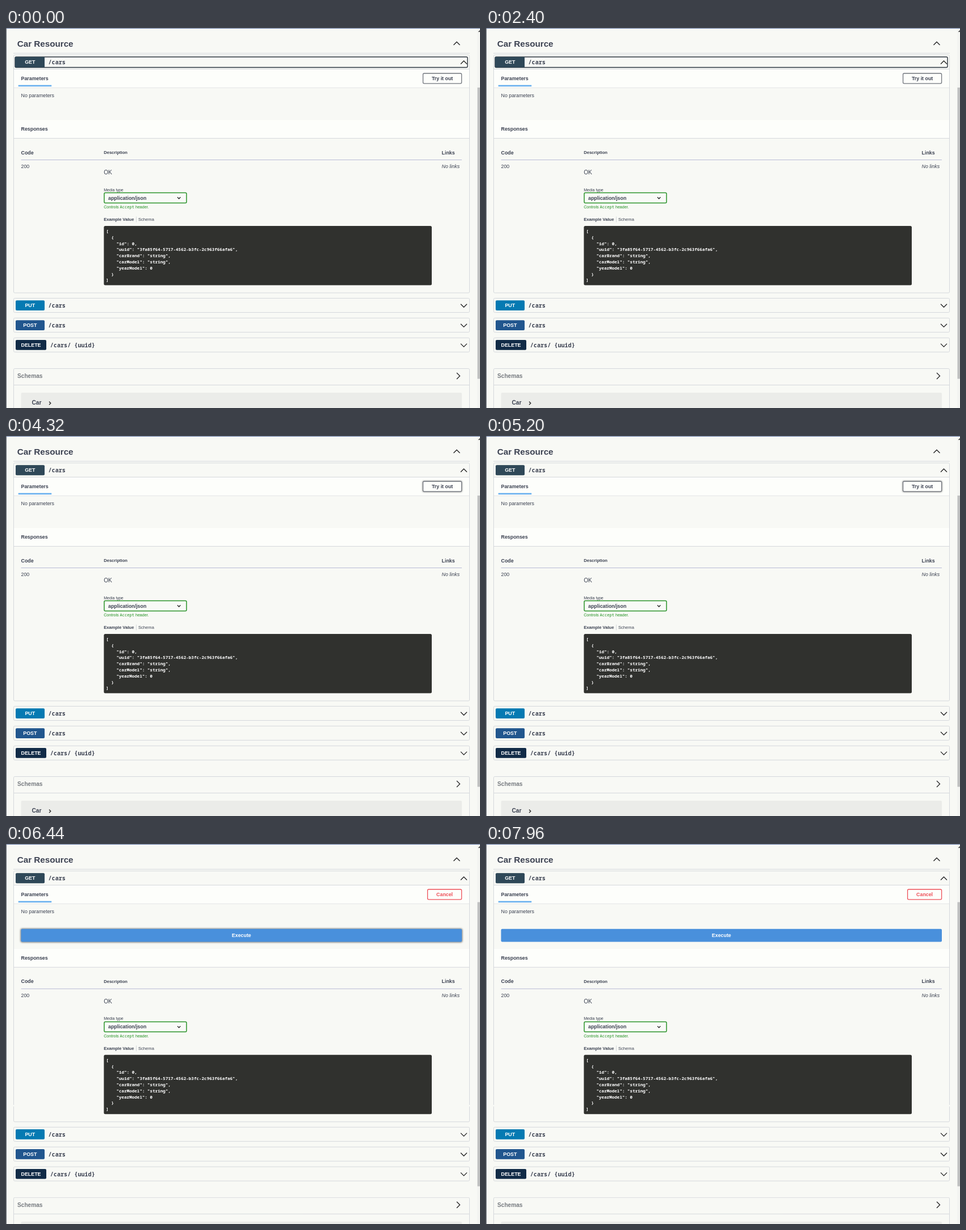
An HTML page that plays this animation: 835 px wide and 670 px high, repeating every 8000 ms.

```html
<!DOCTYPE html>
<html lang="en">
<head>
<meta charset="utf-8">
<title>API explorer</title>
<style>
html, body { margin: 0; width: 100%; height: 100%; overflow: hidden; background: #f8f9f5; }
svg { display: block; width: 835px; height: 670px; font: 8.86px "Liberation Sans", Arial, sans-serif; fill: #3b4151; }
text { white-space: pre; }
.b { font-weight: 700; }
.s { font-size: 7.6px; }
.xs { font-size: 7.09px; }
.m { font-size: 10.13px; }
.mid { text-anchor: middle; }
.w { fill: #fff; }
.mono { font-family: "Noto Sans Mono", "DejaVu Sans Mono", monospace; }
.path { font-size: 10.13px; font-weight: 600; }
.code { font-size: 7.59px; font-weight: 600; fill: #fff; }
.box, .rule { fill: none; stroke: #d5d8dc; }
.bar { fill: #fdfefb; }
.icon { fill: none; stroke: #222; stroke-width: 1.3; }
.halo { fill: #000; filter: blur(1.6px); opacity: 0; }

/* state changes on an 8 s clock */
.focus, .blur, .idle, .open, .low { animation: 8s step-end infinite; }
.focus { animation-name: focus; }
.blur { animation-name: blur; }
.idle { animation-name: idle; }
.open { animation-name: open; }
.low { animation-name: low; }
.tryHalo { animation: tryHalo 8s infinite; }
.execHalo { animation: execHalo 8s infinite; }
.cancel { animation: redden 8s infinite; }
@keyframes focus { 0% { visibility: visible } 36.5%, 100% { visibility: hidden } }
@keyframes blur { 0% { visibility: hidden } 36.5%, 100% { visibility: visible } }
@keyframes idle { 0% { visibility: visible } 67.25%, 100% { visibility: hidden } }
@keyframes open { 0% { visibility: hidden } 67.25%, 100% { visibility: visible } }
@keyframes low { 0% { transform: none } 67.25%, 100% { transform: translateY(22.8px) } }
@keyframes tryHalo { 0%, 52.5% { opacity: 0 } 54.5%, 100% { opacity: .4 } }
@keyframes execHalo { 0%, 78.75% { opacity: 0 } 80.25%, 90% { opacity: .5 } 91.5%, 100% { opacity: 0 } }
@keyframes redden { 0%, 67.25% { color: #3b4151 } 71%, 100% { color: #ee4f58 } }
</style>
</head>
<body>
<svg viewBox="0 0 835 670">
  <defs>
    <path id="up" class="icon" d="M-5.5 3 0-2.5 5.5 3"/>
    <path id="down" class="icon" d="M-5.5-2.5 0 3 5.5-2.5"/>
    <path id="right" class="icon" d="M-2.5-5.5 3 0-2.5 5.5"/>
  </defs>

  <rect width="835" height="670" fill="#f8f9f5"/>

  <!-- section title -->
  <text class="b" x="19.8" y="33" font-size="15.19">Car Resource</text>
  <use href="#up" x="794" y="27"/>
  <path class="rule" d="M13 44.5H817"/>

  <!-- GET header -->
  <path class="box" d="M13.5 480V49.5a2 2 0 0 1 2-2H814.5a2 2 0 0 1 2 2V480" style="clip-path: inset(0 0 20px)"/>
  <path class="rule" d="M14 72.5H816"/>
  <g class="focus">
    <rect x="16" y="51" width="797" height="18.5" rx="2" fill="none" stroke="#2b3440" stroke-width="1.4"/>
    <rect x="16" y="51" width="52" height="18.5" rx="1" fill="#2f4858"/>
  </g>
  <rect class="blur" x="17" y="51.3" width="51" height="18" rx="2" fill="#2f4858"/>
  <text class="b w mid" x="42.3" y="63.4">GET</text>
  <text class="mono path" x="74.5" y="64.2">/cars</text>
  <use href="#up" x="806.5" y="60.5"/>

  <!-- parameters -->
  <rect class="bar" x="14" y="73" width="802" height="32"/>
  <path class="rule" d="M14 105.3H816" stroke-opacity=".6"/>
  <text class="b" x="26.5" y="92">Parameters</text>
  <rect x="21.7" y="100.6" width="58.5" height="2.5" fill="#66aeee"/>
  <text x="26.5" y="122.4">No parameters</text>

  <g class="idle">
    <rect class="halo tryHalo" x="733.5" y="79" width="70" height="20" rx="3"/>
    <rect x="734.6" y="80" width="68" height="17.8" rx="2" fill="#fdfefb" stroke="#70747c" stroke-width="1.3"/>
    <text class="b mid" x="768.6" y="92">Try it out</text>
  </g>
  <g class="open">
    <g class="cancel">
      <rect x="742.6" y="80" width="60" height="17.8" rx="2" fill="#fdfefb" stroke="currentColor" stroke-width="1.3"/>
      <text class="b mid" x="772.6" y="92" fill="currentColor">Cancel</text>
    </g>
    <rect class="halo execHalo" x="25.5" y="149" width="778.5" height="24.5" rx="3"/>
    <rect x="26.5" y="149.8" width="776.5" height="22.8" rx="2" fill="#4990dc"/>
    <text class="b w mid" x="414.8" y="164.4">Execute</text>
  </g>

  <g class="low">
    <!-- responses -->
    <rect class="bar" x="14" y="162.2" width="802" height="32"/>
    <path class="rule" d="M14 194.5H816"/>
    <text class="b" x="26.5" y="181.4">Responses</text>
    <text class="b" x="26.5" y="222.5">Code</text>
    <text class="b s" x="172.2" y="222">Description</text>
    <text class="b" x="767.6" y="222.5">Links</text>
    <path class="rule" d="M26.5 232.5H803" style="stroke: #b9bbd6"/>
    <text x="26.5" y="247.3">200</text>
    <text class="m" x="172.2" y="258.3">OK</text>
    <text x="767.6" y="247.3" font-style="italic">No links</text>

    <text class="xs" x="172.2" y="287.5">Media type</text>
    <rect x="173" y="290.6" width="145" height="17.8" rx="2" fill="#f9faf7" stroke="#2a932a" stroke-width="1.5"/>
    <text class="b" x="180" y="302.6">application/json</text>
    <path class="icon" d="M302 298.3 304.7 301 307.4 298.3"/>
    <text class="xs" x="172.2" y="318" fill="#209020">Controls <tspan class="mono">Accept</tspan> header.</text>

    <text class="b s" x="172.2" y="340">Example Value</text>
    <path class="rule" d="M229.5 332.5V342.5"/>
    <text class="s" x="233" y="340">Schema</text>

    <rect x="172.4" y="349" width="577.6" height="104.5" rx="2.5" fill="#30312e"/>
    <g class="mono code">
      <text x="176.3" y="361">[</text>
      <text x="176.3" y="371.8">  {</text>
      <text x="176.3" y="382.6">    "id": 0,</text>
      <text x="176.3" y="393.4">    "uuid": "3fa85f64-5717-4562-b3fc-2c963f66afa6",</text>
      <text x="176.3" y="404.2">    "carBrand": "string",</text>
      <text x="176.3" y="415">    "carModel": "string",</text>
      <text x="176.3" y="425.8">    "yearModel": 0</text>
      <text x="176.3" y="436.6">  }</text>
      <text x="176.3" y="447.4">]</text>
    </g>
    <path class="box" d="M13.5 440V465a2 2 0 0 0 2 2H814.5a2 2 0 0 0 2-2V440"/>

    <!-- other operations -->
    <g>
      <rect class="box" x="13.5" y="476.5" width="803" height="25" rx="2"/>
      <rect x="17" y="480.3" width="51" height="17.7" rx="2" fill="#057ab2"/>
      <text class="b w mid" x="42.3" y="492.4">PUT</text>
      <text class="mono path" x="74.5" y="493.2">/cars</text>
      <use href="#down" x="806.5" y="489.3"/>
    </g>
    <g transform="translate(0 34.9)">
      <rect class="box" x="13.5" y="476.5" width="803" height="25" rx="2"/>
      <rect x="17" y="480.3" width="51" height="17.7" rx="2" fill="#21568e"/>
      <text class="b w mid" x="42.3" y="492.4">POST</text>
      <text class="mono path" x="74.5" y="493.2">/cars</text>
      <use href="#down" x="806.5" y="489.3"/>
    </g>
    <g transform="translate(0 69.8)">
      <rect class="box" x="13.5" y="476.5" width="803" height="25" rx="2"/>
      <rect x="17" y="480.3" width="54" height="17.7" rx="2" fill="#112b47"/>
      <text class="b w mid" x="44" y="492.4">DELETE</text>
      <text class="mono path" x="77.8" y="493.2">/cars/ {uuid}</text>
      <use href="#down" x="806.5" y="489.3"/>
    </g>

    <!-- schemas -->
    <rect class="box" x="13.5" y="600.5" width="803" height="120" rx="2"/>
    <path class="rule" d="M14 629.5H816"/>
    <text class="b m" x="20" y="617" fill="#777b80">Schemas</text>
    <use href="#right" x="796.5" y="613.5"/>
    <rect x="26.5" y="643" width="776.5" height="60" rx="2" fill="#ebece9"/>
    <text class="b m" x="45.5" y="664.3">Car</text>
    <path class="icon" d="M76 658.7 78.8 661.5 76 664.3"/>
  </g>

  <!-- window edges and scrollbar -->
  <path d="M0 .5H835" stroke="#5d729f"/>
  <path d="M.5 0V670" stroke="#626971"/>
  <rect x="830" y="1" width="5" height="669" fill="#f3f4f1"/>
  <path d="M831.5 7 835 3.5V7Z" fill="#555"/>
  <rect class="idle" x="830.5" y="105" width="4.5" height="513.5" fill="#bfc0c0"/>
  <rect class="open" x="830.5" y="102.5" width="4.5" height="501" fill="#bfc0c0"/>
</svg>
</body>
</html>
```
